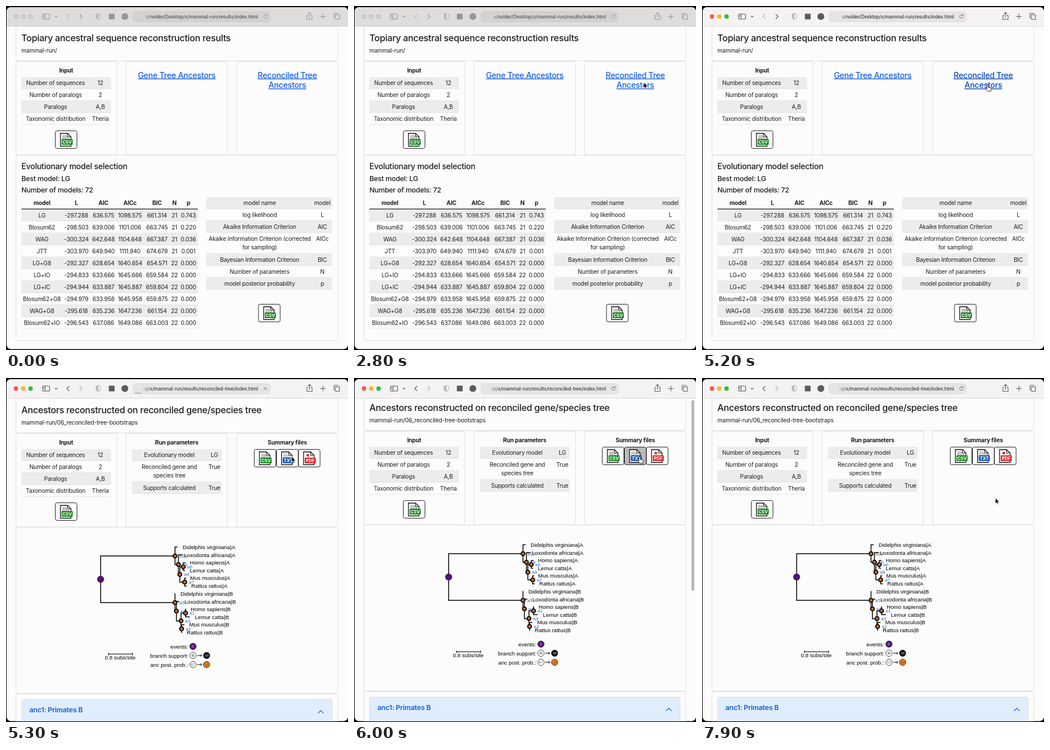
An HTML page for the animation above (8 s loop, 600 px wide and 605 px high).

```html
<!DOCTYPE html>
<html lang="en">
<head>
<meta charset="utf-8">
<title>Ancestral reconstruction report</title>
<style>
html, body { margin: 0; width: 100%; height: 100%; overflow: hidden; background: #000; }
svg { display: block; --bar: #dfdcdc; --field: #d4d1d1; --icon: #98969a; --dim: #bab8ba; --url: #555; --edge: #c8c6c6; }
svg.on { --bar: #f4f2f2; --field: #e7e4e4; --icon: #5c5a5e; --dim: #b9b7b9; --url: #3c3c3e; --edge: #d5d3d3; }
text { font: 10.15px Inter, sans-serif; letter-spacing: -.018em; fill: #1b1e22; }
.m { text-anchor: middle; }
.e { text-anchor: end; }
.b { font-weight: 700; }
.h1 { font-size: 15.9px; font-weight: 550; }
.h2 { font-size: 14px; font-weight: 550; }
.h3 { font-size: 12.3px; font-weight: 550; }
.link { font-size: 14px; font-weight: 550; fill: #1560ea; text-decoration: underline; }
.link.over { fill: #0c4cbc; }
.url { font-size: 8.3px; font-weight: 500; fill: var(--url); }
.tag { font-size: 8px; font-weight: 700; fill: #fff; }
.a { font: 9.6px "Liberation Sans", Arial, sans-serif; letter-spacing: 0; fill: #000; }
.id { font-size: 8px; fill: #2d67c4; }
.tiny { font-size: 4.6px; }
.card { fill: #fcfcfc; stroke: #dfdfdf; }
.icon { fill: none; stroke: var(--icon); stroke-width: 1.1; stroke-linecap: round; stroke-linejoin: round; }
.icon.thin { stroke-width: .8; }
.tree { fill: none; stroke: #000; stroke-width: 1.5; }
</style>
</head>
<body>
<svg id="stage" width="600" height="605" viewBox="0 0 600 605"></svg>
<script>
const LOOP = 8000;
const ACTIVATE = 3600, OPEN = 5300, LOADED = 5450, HOVER = 5600;
const stage = document.getElementById('stage');

const text = (x, y, s, cls = '') => `<text x="${x}" y="${y}" class="${cls}">${s}</text>`;
const rect = (x, y, w, h, attrs) => `<rect x="${x}" y="${y}" width="${w}" height="${h}" ${attrs}/>`;
const dot = (x, y, r, attrs) => `<circle cx="${x}" cy="${y}" r="${r}" ${attrs}/>`;
const path = (d, attrs) => `<path d="${d}" ${attrs}/>`;
const card = (x1, y1, x2, y2) => rect(x1 + .5, y1 + .5, x2 - x1 - 1, y2 - y1 - 1, 'rx="2.5" class="card"');

// Striped table; a "|" in a cell breaks the line.
function table(x1, x2, top, centres, rows) {
  let y = top;
  return rows.map((row, i) => {
    const height = row.some(c => c.includes('|')) ? 36.5 : 21;
    let out = i % 2 ? '' : rect(x1, y, x2 - x1, height, 'fill="#ececec"');
    out += rect(x1, y + height - .8, x2 - x1, .8, 'fill="#dee1e4"');
    row.forEach((cell, c) => cell.split('|').forEach((line, k) =>
      out += text(centres[c], y + 14 + k * 15.3, line, 'm')));
    y += height;
    return out;
  }).join('');
}

function fileButton(x, y, label, color, id = '') {
  const inner = {
    CSV: path('M12 9h9M12 11.5h14M12 14h14M15.5 8v7M19 8v7M23 11v4', 'stroke="#888" stroke-width=".8"'),
    TXT: path('M12 9h8M12 11.5h14M12 14h14', 'stroke="#888"'),
    PDF: dot(17, 11, 2.6, 'fill="#d9403a"')
  }[label];
  return `<g transform="translate(${x} ${y})">
    ${rect(.5, .5, 38, 31, `rx="3" fill="#fff" stroke="#222" id="${id}"`)}
    ${path('M9.5 5h12.5l6 6v16.5H9.5z', 'fill="#fff" stroke="#111" stroke-width="1.3"')}
    ${path('M22 5v6h6', 'fill="none" stroke="#111" stroke-width="1.1"')}${inner}
    ${rect(11.5, 15, 19.5, 10, `rx="1" fill="${color}"`)}${text(21.2, 23, label, 'tag m')}</g>`;
}

const topCards = card(17, 30, 582.5, 97) + card(17, 97, 195, 262.5) +
  card(210, 97, 389, 262.5) + card(404, 97, 582.5, 262.5);

const inputCard = text(105.5, 117, 'Input', 'm b') +
  table(27, 184, 125, [87, 165.5], [
    ['Number of sequences', '12'], ['Number of paralogs', '2'],
    ['Paralogs', 'A,B'], ['Taxonomic distribution', 'Theria']]) +
  fileButton(86, 219, 'CSV', '#168a1c');

function overview() {
  const columns = [63, 123.5, 171, 217.5, 265, 295.5, 320];
  const heads = ['model', 'L', 'AIC', 'AICc', 'BIC', 'N', 'p'];
  const models = `LG -297.288 636.575 1098.575 661.314 21 0.743
    Blosum62 -298.503 639.006 1101.006 663.745 21 0.220
    WAG -300.324 642.648 1104.648 667.387 21 0.036
    JTT -303.970 649.940 1111.940 674.679 21 0.001
    LG+G8 -292.327 628.654 1640.654 654.571 22 0.000
    LG+IO -294.833 633.666 1645.666 659.584 22 0.000
    LG+IC -294.944 633.887 1645.887 659.804 22 0.000
    Blosum62+G8 -294.979 633.958 1645.958 659.875 22 0.000
    WAG+G8 -295.618 635.236 1647.236 661.154 22 0.000
    Blosum62+IO -296.543 637.086 1649.086 663.003 22 0.000`;
  return topCards + card(17, 262, 582.5, 589) +
    text(27, 62, 'Topiary ancestral sequence reconstruction results', 'h1') +
    text(27, 82, 'mammal-run/') + inputCard +
    text(299.5, 126.5, 'Gene Tree Ancestors', 'link m') +
    `<g id="target">${text(493.5, 126.5, 'Reconciled Tree', 'link m')}${text(493.5, 144, 'Ancestors', 'link m')}</g>` +
    text(27, 287, 'Evolutionary model selection', 'h2') +
    text(27, 307.5, 'Best model: LG', 'h3') +
    text(27, 328, 'Number of models: 72', 'h3') +
    heads.map((h, i) => text(columns[i], 350, h, 'm b')).join('') +
    table(27, 336.5, 357.5, columns, models.split('\n').map(r => r.trim().split(' '))) +
    rect(27, 356.4, 309.5, 1.3, 'fill="#222"') +
    table(351, 572, 336, [445, 555], [
      ['model name', 'model'], ['log likelihood', 'L'],
      ['Akaike Information Criterion', 'AIC'],
      ['Akaike Information Criterion (corrected|for sampling)', 'AICc'],
      ['Bayesian Information Criterion', 'BIC'],
      ['Number of parameters', 'N'], ['model posterior probability', 'p']]) +
    fileButton(442.5, 524, 'CSV', '#168a1c');
}

function tree() {
  const species = ['Didelphis virginiana', 'Loxodonta africana', 'Homo sapiens',
    'Lemur catta', 'Mus musculus', 'Rattus rattus'];
  const tips = (paralog, y, xs) => species.map((s, i) =>
    text(xs[i], y + i * 13.6, `${s}|${paralog}`, 'a')).join('');
  const nodes = [
    [296.5, 313, 'a10', 304], [302.5, 328, 'a9', 309.5], [305, 345.5, 'a8', 312.5],
    [311, 332, 'a6', 318], [313.5, 359, 'a7', 321], [296.5, 395, 'a5', 304],
    [299, 410, 'a4', 306], [307, 427, 'a3', 314.3], [315, 413.5, 'a1', 322], [308, 441, 'a2', 315.5]];
  const keyDot = (x, y, fill, label, ink) => dot(x, y, 5.6, `fill="${fill}" stroke="#222" stroke-width=".8"`) +
    `<text x="${x}" y="${y + 1.6}" class="a tiny m" style="fill:${ink}">${label}</text>`;
  const arrow = y => path(`M335.5 ${y}h8m-2.2-2l2.2 2-2.2 2`, 'fill="none" stroke="#000"');
  return path(`M296.5 313H166V395H296.5
      M301 297.3H296.5V328H302.5M310 311H302.5V345.5H305M311 332H305V359H313.5
      M315 325H311V338.4H314M316 352H313.5V366H317
      M297 379.3H296.5V410H299M304 393H299V427.5H307M315 413.5H307V441H308
      M316 406.5H315V420.3H322.5M313 434H308V447.5H309`, 'class="tree"') +
    nodes.map(([x, y]) => dot(x, y, 3.4, 'fill="#c9681c" stroke="#000" stroke-width="1.8"')).join('') +
    nodes.map(([, y, id, x]) => text(x, y + 2.7, id, 'a id')).join('') +
    dot(166, 354, 5.8, 'fill="#55107a" stroke="#2f0a48" stroke-width=".6"') +
    tips('A', 301, [310, 312, 322.5, 322.5, 323, 325]) +
    tips('B', 383, [306, 313, 324, 331.5, 321.5, 317]) +
    path('M180 485.5h42M180 483.5v4M222 483.5v4', 'fill="none" stroke="#000" stroke-width="1.2"') +
    text(200.5, 495, '0.8 subs/site', 'a m') +
    text(319.5, 475.5, 'events:', 'a e') + keyDot(328, 472, '#55107a', 'D', '#fff') +
    text(319.5, 491.5, 'branch support:', 'a e') + keyDot(328, 488, '#fff', '50', '#000') +
    arrow(488) + keyDot(352, 488, '#000', '100', '#fff') +
    text(319.5, 507.5, 'anc post. prob.:', 'a e') + keyDot(328, 504, '#fff', '0.7', '#000') +
    arrow(504) + keyDot(352, 504, '#e07a1f', '1.0', '#7a3c00');
}

function details() {
  return topCards + card(17, 262, 582.5, 555) + card(17, 555, 582.5, 640) +
    text(27, 62, 'Ancestors reconstructed on reconciled gene/species tree', 'h1') +
    text(27, 82, 'mammal-run/06_reconciled-tree-bootstraps') + inputCard +
    text(299.5, 117, 'Run parameters', 'm b') +
    table(221, 378.5, 125, [286.5, 365.5], [
      ['Evolutionary model', 'LG'], ['Reconciled gene and|species tree', 'True'],
      ['Supports calculated', 'True']]) +
    text(493.5, 117, 'Summary files', 'm b') +
    fileButton(435, 125, 'CSV', '#168a1c') + fileButton(474, 125, 'TXT', '#1f5fb8', 'txt') +
    fileButton(512.5, 125, 'PDF', '#dc2a2a') + tree() +
    rect(27.5, 565.5, 544.5, 60, 'rx="3" fill="#e0edfc" stroke="#d3dfee"') +
    '<text x="41" y="588" class="h3" style="fill:#1a5fd0;font-weight:600">anc1: Primates B</text>' +
    path('M547.5 589.5l4.7-4.7 4.7 4.7', 'fill="none" stroke="#1a5fd0" stroke-width="1.2"');
}

function toolbar() {
  const icon = (d, attrs = '', cls = '') => path(d, `class="icon ${cls}" ${attrs}`);
  const lights = ['#f4594f', '#f5bb2e', '#2fc03f'].map((c, i) =>
    dot(17.5 + i * 12.8, 18.5, 3.9, `class="light" data-color="${c}" stroke-width=".8"`)).join('');
  return rect(0, 0, 600, 36, 'style="fill:var(--bar)"') + rect(0, 35.3, 600, .8, 'style="fill:var(--edge)"') + lights +
    icon('M66 14h8.5a2 2 0 0 1 2 2v5a2 2 0 0 1-2 2h-8.5a2 2 0 0 1-2-2v-5a2 2 0 0 1 2-2zM68.5 14v9M65.5 16.5h1.3M65.5 18.5h1.3') +
    icon('M86 17.7l2 2 2-2') +
    icon('M110.5 14.5l-4 4 4 4', 'id="back"') + icon('M129.5 14.5l4 4-4 4', 'id="forward"') +
    icon('M162 13l4 1.5v4q0 3.5-4 5.5-4-2-4-5.5v-4z', 'style="stroke:var(--dim)"') +
    path('M162 13v11q-4-2-4-5.5v-4z', 'style="fill:var(--dim)"') +
    rect(180.5, 13.5, 10, 10, 'style="fill:var(--icon)"') +
    dot(208.5, 18.5, 6, 'style="fill:var(--icon)"') +
    rect(223, 10, 240, 17.5, 'rx="4.5" style="fill:var(--field);stroke:var(--edge)" stroke-width=".8"') +
    `<g clip-path="url(#field)">${text(442, 21.7, '', 'url e')}</g>` +
    rect(236, 12, 18, 14, 'fill="url(#fade)"') +
    icon('M457.6 16.5a3.1 3.1 0 1 0 .7 2.5M458 14.7v2.1h-2.1', 'id="reload"', 'thin') +
    icon('M452.7 16.2l4.6 4.6M457.3 16.2l-4.6 4.6', 'id="stop"', 'thin') +
    rect(226, 26.2, 11, 1.2, 'id="progress" fill="#8a9ab8"') +
    icon('M530 16.5h-2v7h9v-7h-2M532.5 20v-8.5M530 13.8l2.5-2.5 2.5 2.5') +
    icon('M556 14v9M551.5 18.5h9') +
    icon('M578 15.5h7v8h-7zM575.5 21.5v-8.5h7.5');
}

stage.innerHTML = `<defs>
    <clipPath id="window"><rect x="1" y="2" width="599" height="601.5" rx="8"/></clipPath>
    <clipPath id="field"><rect x="238" y="10" width="215" height="17"/></clipPath>
    <linearGradient id="fade"><stop offset=".1" style="stop-color:var(--field)"/>
      <stop offset="1" style="stop-color:var(--field);stop-opacity:0"/></linearGradient>
  </defs>
  <g clip-path="url(#window)">
    ${rect(0, 0, 600, 605, 'fill="#fcfcfc"')}
    <g id="overview">${overview()}</g><g id="details">${details()}</g>
    ${rect(592, 39, 5, 335, 'rx="2.5" fill="#b9b9b9" id="scrollbar"')}
    ${toolbar()}
  </g>
  <g id="pointer">
    ${path('M0 0v10.2l2.3-2.2 1.6 3.6 1.6-.7-1.6-3.5h3.3z', 'id="arrow" stroke="#fff" stroke-width=".8"')}
    ${path('M-1.2 1.2a1.2 1.2 0 0 1 2.4 0v3.6l3.8.8q1.5.4 1.4 2l-.7 4.4h-5.2l-3.9-4.4q-.5-1.3.9-1.2l1.3 1.1z', 'id="hand" fill="#fff" stroke="#111" stroke-width=".9"')}
  </g>`;

const el = id => document.getElementById(id);
const show = (id, on) => el(id).style.display = on ? '' : 'none';
const ramp = (t, a, b) => Math.min(1, Math.max(0, (t - a) / (b - a)));
const ease = k => k * k * (3 - 2 * k);
const urlText = stage.querySelector('.url');
const lights = [...stage.querySelectorAll('.light')];
const links = [...el('target').children];

// time, x, y of the pointer
const route = [[2100, 612, 215], [2700, 508.3, 134.5], [2900, 508.3, 134.5], [3000, 503, 136],
  [3200, 503, 136], [3400, 502, 138], [3600, 504.8, 138], [4700, 504.8, 138], [5200, 501, 138],
  [6600, 501, 138.3], [7300, 514.6, 211]];

function pointerAt(t) {
  const i = route.findIndex(p => p[0] > t);
  if (i === 0) return route[0].slice(1);
  if (i < 0) return route[route.length - 1].slice(1);
  const [a, b] = [route[i - 1], route[i]];
  const k = ease(ramp(t, a[0], b[0]));
  return [a[1] + (b[1] - a[1]) * k, a[2] + (b[2] - a[2]) * k];
}

function draw(t) {
  const active = t >= ACTIVATE, second = t >= OPEN, loading = second && t < LOADED;
  const [x, y] = pointerAt(t);
  const overLink = active && !second;
  const overButton = t >= HOVER && y < 153;
  const hand = overLink || overButton;

  stage.setAttribute('class', active ? 'on' : '');
  lights.forEach(l => {
    l.style.fill = active ? l.dataset.color : '#d2cfd0';
    l.style.stroke = active ? 'none' : '#b5b3b4';
  });
  show('overview', !second);
  show('details', second);
  links.forEach(l => l.classList.toggle('over', overLink));
  el('back').style.stroke = second ? '' : 'var(--dim)';
  el('forward').style.stroke = second ? 'var(--dim)' : '';
  urlText.textContent = second
    ? 'op/x/mammal-run/results/reconciled-tree/index.html'
    : 's/nolder/Desktop/x/mammal-run/results/index.html';
  show('reload', !loading);
  show('stop', loading);
  show('progress', loading);

  const scroll = 4 * ease(ramp(t, 5750, 5950));
  el('details').setAttribute('transform', `translate(0 ${-scroll})`);
  el('scrollbar').style.opacity = t < 5750 ? 0 : 1 - ramp(t, 6450, 6700);
  el('txt').style.fill = overButton ? '#b9b9b9' : '';
  el('pointer').setAttribute('transform', `translate(${x} ${y})`);
  show('arrow', !hand);
  show('hand', hand);
}

function tick() {
  draw(performance.now() % LOOP);
  requestAnimationFrame(tick);
}
tick();
</script>
</body>
</html>
```
